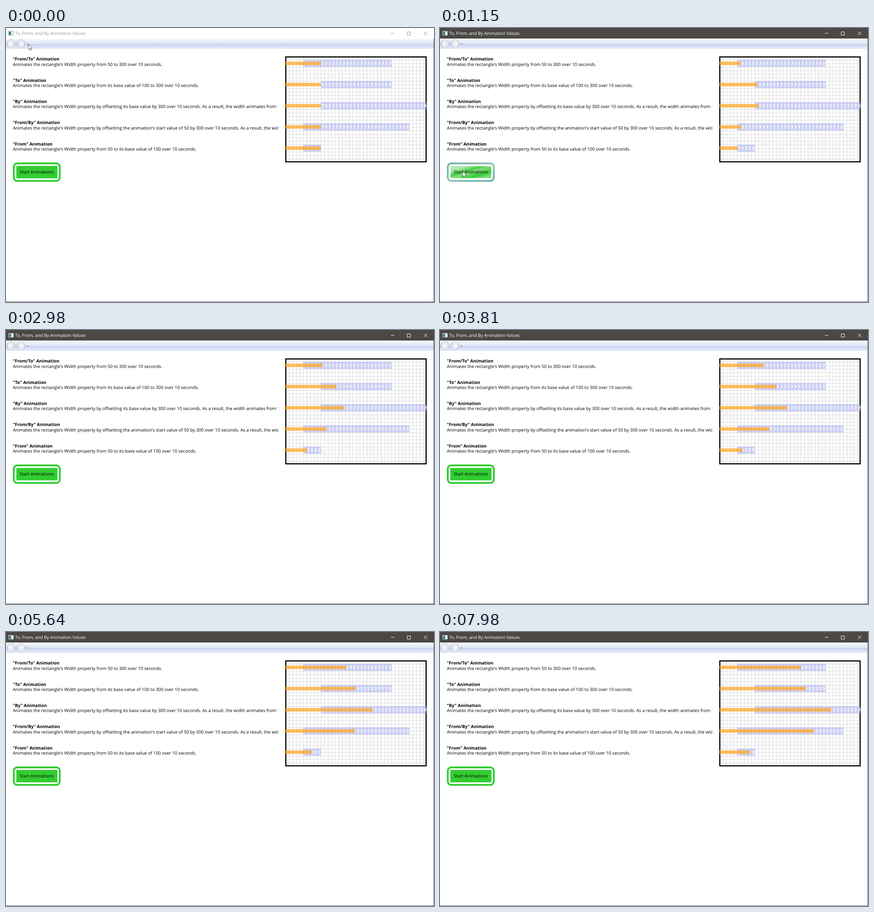
Animation, 935 px wide and 599 px high, one loop 8 s. Source, as an HTML page:

```html
<!DOCTYPE html>
<html lang="en">
<head>
<meta charset="utf-8">
<title>Animation Values</title>
<style>
  html, body { margin: 0; width: 100%; height: 100%; overflow: hidden; background: #fff; }
  svg { display: block; width: 935px; height: 599px; }
  text { font: 9.64px "Open Sans", "Noto Sans", sans-serif; fill: #000; white-space: pre; text-rendering: geometricPrecision; }
  .head { font-size: 9.6px; font-weight: 700; }
  .caption { font-size: 9.58px; }
  .line { fill: none; stroke-width: 1; }
</style>
</head>
<body>
<svg viewBox="0 0 935 599">
  <defs>
    <linearGradient id="toolbar" x2="0" y2="1">
      <stop offset="0" stop-color="#fafbfe"/>
      <stop offset=".2" stop-color="#eef2fb"/>
      <stop offset=".5" stop-color="#dde5f5"/>
      <stop offset=".56" stop-color="#c5d1ee"/>
      <stop offset=".68" stop-color="#d3dcf3"/>
      <stop offset="1" stop-color="#eaeefa"/>
    </linearGradient>
    <linearGradient id="disc" x2="0" y2="1">
      <stop offset="0" stop-color="#f3f5f9"/>
      <stop offset=".5" stop-color="#d5dbe6"/>
      <stop offset="1" stop-color="#eef2fa"/>
    </linearGradient>
    <linearGradient id="glass" x2="1" y2="1" stop-color="#fff">
      <stop offset=".2" stop-color="#f5f5f5" stop-opacity=".65"/>
      <stop offset=".4" stop-color="#f5f5f5" stop-opacity=".1"/>
      <stop offset=".5" stop-color="#f5f5f5" stop-opacity=".4"/>
      <stop offset=".72" stop-color="#f5f5f5" stop-opacity="0"/>
      <stop offset=".9" stop-color="#f5f5f5" stop-opacity=".45"/>
      <stop offset="1" stop-color="#f5f5f5" stop-opacity=".1"/>
    </linearGradient>
    <linearGradient id="rim" x2="1" y2="1">
      <stop offset="0" stop-color="#74b3a6"/>
      <stop offset=".5" stop-color="#8cc3b6"/>
      <stop offset="1" stop-color="#6fb1a4"/>
    </linearGradient>
    <pattern id="grid" x="610.5" y="62" width="7.725" height="7.725" patternUnits="userSpaceOnUse">
      <path d="M0 0H7.725V.77H.77V7.725H0Z" fill="#cfcfd2"/>
    </pattern>
    <pattern id="chevrons" x="610.5" y="69.5" width="7.725" height="46.35" patternUnits="userSpaceOnUse">
      <path d="M.6 3.9H3.4L7 7.72L3.4 11.55H.6L4.2 7.72Z" fill="#fff" fill-opacity=".9"/>
    </pattern>
    <clipPath id="column"><path d="M0 46H595V290H0Z"/></clipPath>
  </defs>

  <rect width="935" height="599" fill="#fff"/>
  <rect id="titleBar" width="935" height="23"/>
  <g>
    <rect x="5.5" y="7" width="11" height="9" fill="#f5f7f7" stroke="#8b9696" stroke-width=".8"/>
    <rect x="6.3" y="8.3" width="5" height="7" fill="#2f8577"/>
  </g>
  <text id="caption" class="caption" x="20" y="15">To, From, and By Animation Values</text>
  <path id="controls" class="line" d="M841 11.5H848M876.5 8.5H883.5V15.5H876.5ZM912.8 8L920.3 15.5M920.3 8L912.8 15.5"/>

  <rect y="23" width="935" height="23" fill="url(#toolbar)"/>
  <g fill="url(#disc)" stroke="#b4bac6">
    <circle cx="11" cy="34.3" r="9.2"/>
    <circle cx="32.5" cy="34.3" r="9.2"/>
  </g>
  <path d="M16 34.3H6.5M10.5 30L6.3 34.3L10.5 38.6M27.5 34.3H37M33 30L37.2 34.3L33 38.6"
        fill="none" stroke="#fff" stroke-width="2.2"/>
  <path d="M45 34H49.4L47.2 36.4Z" fill="#7d879c"/>

  <g id="labels" clip-path="url(#column)"></g>

  <rect x="610.5" y="62" width="308.5" height="231.75" fill="url(#grid)"/>
  <rect x="611.25" y="63.25" width="306.5" height="229.25" fill="none" stroke="#000" stroke-width="2.5"/>
  <g id="tracks"></g>

  <rect id="frame" x="17" y="295.9" width="100.5" height="38.4" rx="7.5" fill="#fff" stroke-width="4"/>
  <rect x="22.5" y="301.5" width="90" height="27.2" fill="#32cd32"/>
  <g id="highlight">
    <rect x="22.5" y="301.5" width="90" height="27.2" fill="url(#glass)"/>
    <rect x="21.5" y="300.5" width="92" height="29.2" rx="3" fill="none"
          stroke="#fff" stroke-opacity=".55" stroke-width="4"/>
  </g>
  <text class="caption" x="30" y="318.2">Start Animations</text>

  <path d="M934.5 23V599M0 598.5H935" class="line" stroke="#65656a"/>
  <path id="cursor" d="M0 0V11.2L2.6 8.8L4.4 12.8L6.3 12L4.6 8.1H8.1Z"
        fill="#fff" stroke="#4c4c55" stroke-width=".9"/>
</svg>
<script>
const LOOP = 8000, STEP = 1000 / 6, LEAD = 16.67;
const START = 780, DURATION = 10000;
const UNIT = 0.7725, LEFT = 610.5, ROW = 46.35, BASE = 100;

const rows = [
  { name: '"From/To"', from: 50, to: 300,
    note: "from 50 to 300 over 10 seconds." },
  { name: '"To"', from: 100, to: 300,
    note: "from its base value of 100 to 300 over 10 seconds." },
  { name: '"By"', from: 100, to: 400,
    note: "by offsetting its base value by 300 over 10 seconds. As a result, the width animates from 100 to 400." },
  { name: '"From/By"', from: 50, to: 350,
    note: "by offsetting the animation's start value of 50 by 300 over 10 seconds. As a result, the width animates from 50 to 350." },
  { name: '"From"', from: 50, to: 100,
    note: "from 50 to its base value of 100 over 10 seconds." }
];

const byId = id => document.getElementById(id);
const set = (el, attrs) => {
  for (const key in attrs) el.setAttribute(key, attrs[key]);
  return el;
};
function add(parent, tag, attrs, content = "") {
  const el = set(document.createElementNS(parent.namespaceURI, tag), attrs);
  el.textContent = content;
  return parent.appendChild(el);
}

rows.forEach((row, i) => {
  const dy = i * ROW;
  add(byId("labels"), "text", { class: "head", x: 15, y: 71.3 + dy }, row.name + " Animation");
  add(byId("labels"), "text", { x: 15, y: 82.7 + dy }, "Animates the rectangle's Width property " + row.note);
  const track = { x: LEFT + row.from * UNIT, y: 69.5 + dy, width: (row.to - row.from) * UNIT, height: 15.45 };
  add(byId("tracks"), "rect", { ...track, fill: "rgba(150,155,240,.45)" });
  add(byId("tracks"), "rect", { ...track, fill: "url(#chevrons)" });
  row.bar = add(byId("tracks"), "rect",
    { x: LEFT, y: 73.4 + dy, height: 7.725, fill: "rgba(255,158,10,.65)" });
});

function draw(time) {
  // The screen refreshes six times a second.
  const t = Math.max(0, Math.floor((time + LEAD + 10) / STEP) * STEP - LEAD);
  const active = t > 600, hover = t > 400 && t < 1400;

  rows.forEach(({ bar, from, to }) => {
    const width = t < START ? BASE : from + (to - from) * (t - START) / DURATION;
    set(bar, { width: width * UNIT });
  });

  byId("titleBar").style.fill = active ? "#4b4845" : "#fff";
  byId("caption").style.fill = active ? "#fff" : "#999";
  byId("controls").style.stroke = active ? "#fff" : "#999";
  byId("frame").style.stroke = hover ? "url(#rim)" : "#32cd32";
  byId("highlight").style.display = hover ? "" : "none";

  const p = Math.min(1, t / 480), ease = p * p * (3 - 2 * p);
  set(byId("cursor"), {
    transform: `translate(${49.3 + ease * 0.5} ${36 + ease * 278})`,
    visibility: t < 1400 ? "visible" : "hidden"
  });
}

const begin = performance.now();
function tick() {
  draw((performance.now() - begin) % LOOP);
  requestAnimationFrame(tick);
}
tick();
</script>
</body>
</html>
```
